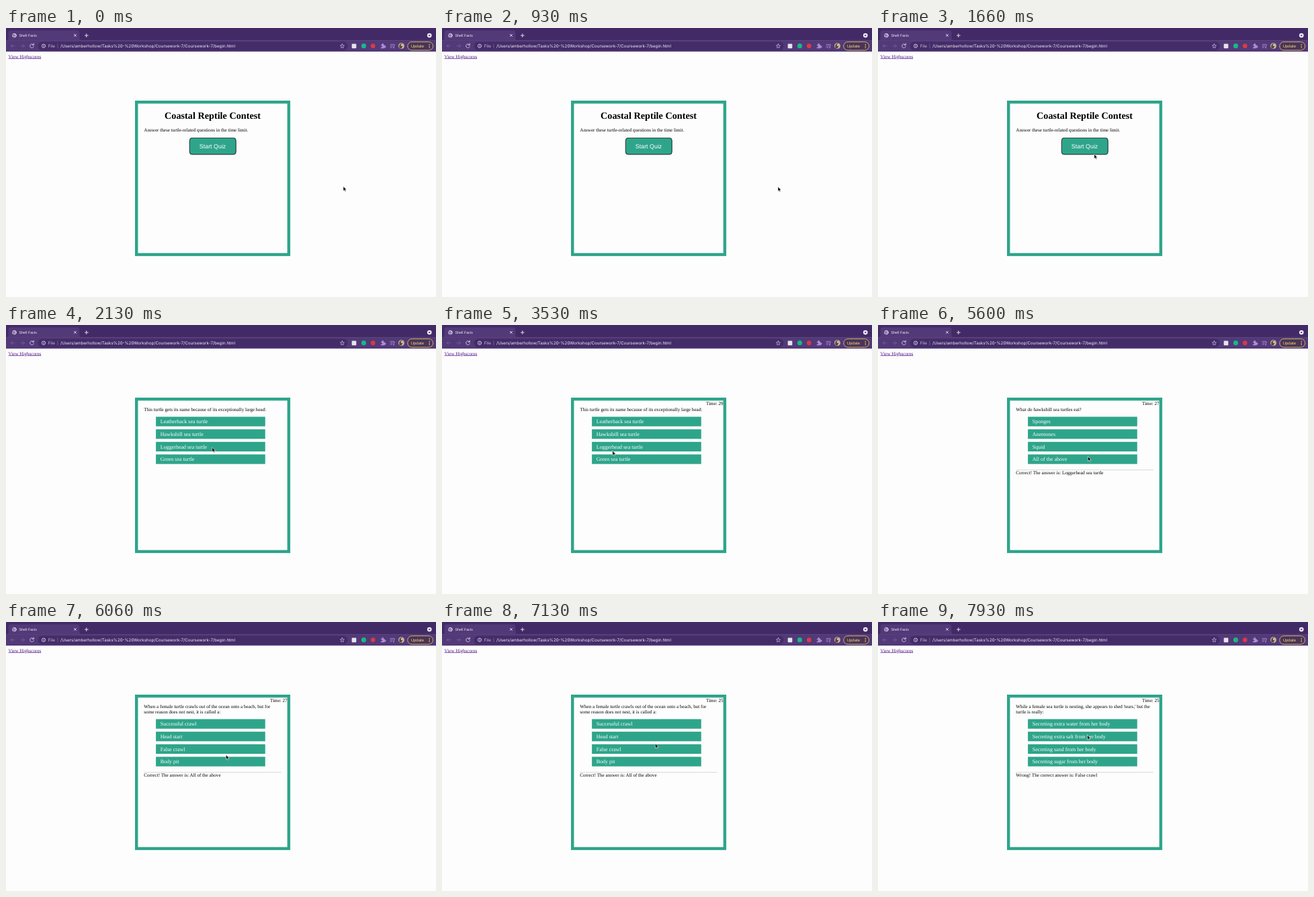
These frames come from a looping animation (640x400 px, 8000 ms). An HTML page:

```html
<!DOCTYPE html>
<html lang="en">
<head>
<meta charset="utf-8">
<title>Quiz</title>
<style>
  html, body { margin: 0; width: 100%; height: 100%; overflow: hidden; background: #fdfdfd; }
  svg { display: block; width: 640px; height: 400px; text-rendering: geometricPrecision; }
  .ui { font-family: "Liberation Sans", Arial, sans-serif; }
  .url { font-family: Inter, "Liberation Sans", sans-serif; font-size: 14px; }
  #page { font: 16px "Liberation Serif", "Times New Roman", serif; }
  .line { fill: none; stroke-width: 2; stroke-linecap: round; stroke-linejoin: round; }
</style>
</head>
<body>
<svg viewBox="0 0 1440 900">
  <!-- browser frame -->
  <rect width="1440" height="900" fill="#fdfdfd"/>
  <rect width="1440" height="42" fill="#422a66"/>
  <rect y="41" width="1440" height="38" fill="#523978"/>
  <path d="M0 41q8 0 8-8V16q0-8 8-8H238q8 0 8 8V33q0 8 8 8z" fill="#523978"/>
  <rect x="107" y="46" width="1037" height="29" rx="14.500" fill="#432c68"/>

  <g class="ui" fill="#f3eef8">
    <g class="line" stroke="#d9cdea">
      <circle cx="28" cy="25" r="6.500" fill="#b7a5d0"/>
      <path d="M22 23h6l3 4M27 31l-2-4" stroke="#523978"/>
      <path d="M228 21l7 7m0-7l-7 7M264 25h11m-5.500-5.500v11" stroke="#f3eef8"/>
      <path d="M29 60H16m6-6l-6 6 6 6M49 60h13m-6-6l6 6-6 6" stroke="#75609a"/>
      <path d="M92 56a6.500 6.500 0 1 0 1 6M93 52v5h-5"/>
      <circle cx="126" cy="60" r="6"/>
      <path d="M126 60v3M126 57v.2"/>
      <path d="M173 53v14" stroke="#75609a"/>
      <path d="M1126 53l2 5 5 .5-4 3.500 1 5-4-3-4 3 1-5-4-3.500 5-.5z" stroke-width="1.500"/>
    </g>
    <text x="44" y="29.500" font-size="12">Shell Facts</text>
    <text class="url" x="141" y="65" fill="#cbbfdc">File</text>
    <text class="url" x="182" y="65">/Users/amberhollow/Tasks%20-%20Workshop/Coursework-7/Coursework-7/begin.html</text>
    <circle cx="1418" cy="25" r="7.500"/>
    <path d="M1414 23h8l-4 5z" fill="#422a66"/>

    <rect x="1158" y="53" width="15" height="15" rx="2" fill="#e6e4e9"/>
    <circle cx="1198" cy="60" r="8" fill="#16b886"/>
    <circle cx="1229" cy="60" r="7.500" fill="#d83a45"/>
    <path d="M1255 56h4a3 3 0 1 1 5 0h4v4a3 3 0 1 1 0 5v3h-13v-4a3 3 0 1 0 0-5z" fill="#b08ad8"/>
    <path class="line" d="M1287 55h13m-13 5h8m-8 5h6M1299 66v-8h3" stroke="#a98bd0"/>
    <circle cx="1298" cy="66" r="2" fill="#a98bd0"/>
    <circle cx="1324" cy="60" r="10" fill="#cbbca2"/>
    <path d="M1317 67q-2-13 7-15 6 1 5 7l-5 10z" fill="#5a4638"/>
    <circle cx="1326" cy="57" r="3.500" fill="#e2c5ab"/>

    <rect x="1345" y="46.500" width="85" height="28" rx="14" fill="#493458" stroke="#e3c462" stroke-width="2"/>
    <g fill="#f6d873">
      <text x="1356" y="65" font-size="13.500">Update</text>
      <circle cx="1418" cy="55" r="1.700"/><circle cx="1418" cy="60.500" r="1.700"/><circle cx="1418" cy="66" r="1.700"/>
    </g>
  </g>

  <g id="page">
    <text x="8" y="101" fill="#551a8b" text-decoration="underline">View Highscores</text>
    <rect x="437" y="248" width="510" height="510" fill="none" stroke="#2ea58a" stroke-width="10"/>
    <g id="intro">
      <text x="692" y="303" font-size="32" font-weight="700" text-anchor="middle">Coastal Reptile Contest</text>
      <text x="462" y="347">Answer these turtle-related questions in the time limit.</text>
      <rect x="615" y="368" width="155" height="55" rx="8" fill="#2ea58a" stroke="#111" stroke-width="2"/>
      <path d="M615 416V376q0-8 8-8H763" fill="none" stroke="#3d5f57" stroke-width="2"/>
      <text class="ui" x="692" y="402" font-size="20" fill="#fff" text-anchor="middle">Start Quiz</text>
    </g>
    <text id="timer" x="942" y="267" text-anchor="end"></text>
  </g>

  <path id="cursor" d="M0 0V15.500L3.600 12.200 6 17.500 8.600 16.400 6.300 11.200H11z" fill="#000" stroke="#fff" stroke-width="1.300"/>
</svg>

<script>
const LOOP = 8000, FPS = 15, UNIT = 2.25;
const TEAL = "#2ea58a";

// [start ms, question lines, answers, feedback]
const questions = [
  [2130, ["This turtle gets its name because of its exceptionally large head:"],
    ["Leatherback sea turtle", "Hawksbill sea turtle", "Loggerhead sea turtle", "Green sea turtle"], ""],
  [3860, ["What do hawksbill sea turtles eat?"],
    ["Sponges", "Anemones", "Squid", "All of the above"],
    "Correct! The answer is: Loggerhead sea turtle"],
  [5930, ["When a female turtle crawls out of the ocean onto a beach, but for",
          "some reason does not nest, it is called a:"],
    ["Successful crawl", "Head start", "False crawl", "Body pit"],
    "Correct! The answer is: All of the above"],
  [7660, ["While a female sea turtle is nesting, she appears to shed 'tears,' but the",
          "turtle is really:"],
    ["Secreting extra water from her body", "Secreting extra salt from her body",
     "Secreting sand from her body", "Secreting sugar from her body"],
    "Wrong! The correct answer is: False crawl"]
];

// [ms, x, y] of the pointer tip in stage pixels
const path = [
  [0, 502, 235.5], [200, 500, 236], [1200, 500, 236], [1333, 470, 228], [1530, 455, 224],
  [1667, 321.5, 187.5], [1867, 307, 182], [2600, 306.5, 182],
  [3000, 275, 188], [3533, 253.7, 187], [3800, 261, 182], [4867, 261.5, 182],
  [5300, 295, 193], [5860, 327.5, 197.5], [6667, 327.5, 197.5],
  [7100, 318, 182], [7467, 311.5, 168]
];

const page = document.getElementById("page");
const intro = document.getElementById("intro");
const timer = document.getElementById("timer");
const cursor = document.getElementById("cursor");

function add(parent, tag, attrs, text = "") {
  const el = document.createElementNS("http://www.w3.org/2000/svg", tag);
  for (const key in attrs) el.setAttribute(key, attrs[key]);
  el.textContent = text;
  return parent.appendChild(el);
}

function buildQuestion([, lines, answers, feedback]) {
  const g = add(page, "g", {});
  const top = 289 + 18 * lines.length;
  lines.forEach((line, i) => add(g, "text", { x: 462, y: 287 + 18 * i }, line));
  answers.forEach((answer, i) => {
    const y = top + 42 * i;
    add(g, "rect", { x: 502, y, width: 366, height: 32, fill: TEAL });
    add(g, "text", { x: 517, y: y + 22, "font-size": 18, fill: "#fff" }, answer);
  });
  if (feedback) {
    add(g, "rect", { x: 462, y: top + 177, width: 460, height: 1.5, fill: "#c8c8c8" });
    add(g, "text", { x: 462, y: top + 192.5 }, feedback);
  }
  return g;
}

const screens = [intro, ...questions.map(buildQuestion)];

function pointerAt(t) {
  const next = path.findIndex(p => p[0] > t);
  if (next < 0) return path[path.length - 1].slice(1);
  const [t0, x0, y0] = path[next - 1], [t1, x1, y1] = path[next];
  const k = (t - t0) / (t1 - t0);
  return [x0 + (x1 - x0) * k, y0 + (y1 - y0) * k];
}

function draw() {
  const t = Math.floor((performance.now() % LOOP + 8) * FPS / 1000) * 1000 / FPS;
  const current = questions.filter(q => q[0] <= t).length;
  screens.forEach((s, i) => s.setAttribute("display", i === current ? "inline" : "none"));
  timer.textContent = t < 3130 ? "" : "Time: " + (29 - Math.floor((t - 3130) / 1000));
  const [x, y] = pointerAt(t);
  cursor.setAttribute("transform", `translate(${x * UNIT} ${y * UNIT})`);
  requestAnimationFrame(draw);
}
draw();
</script>
</body>
</html>
```
